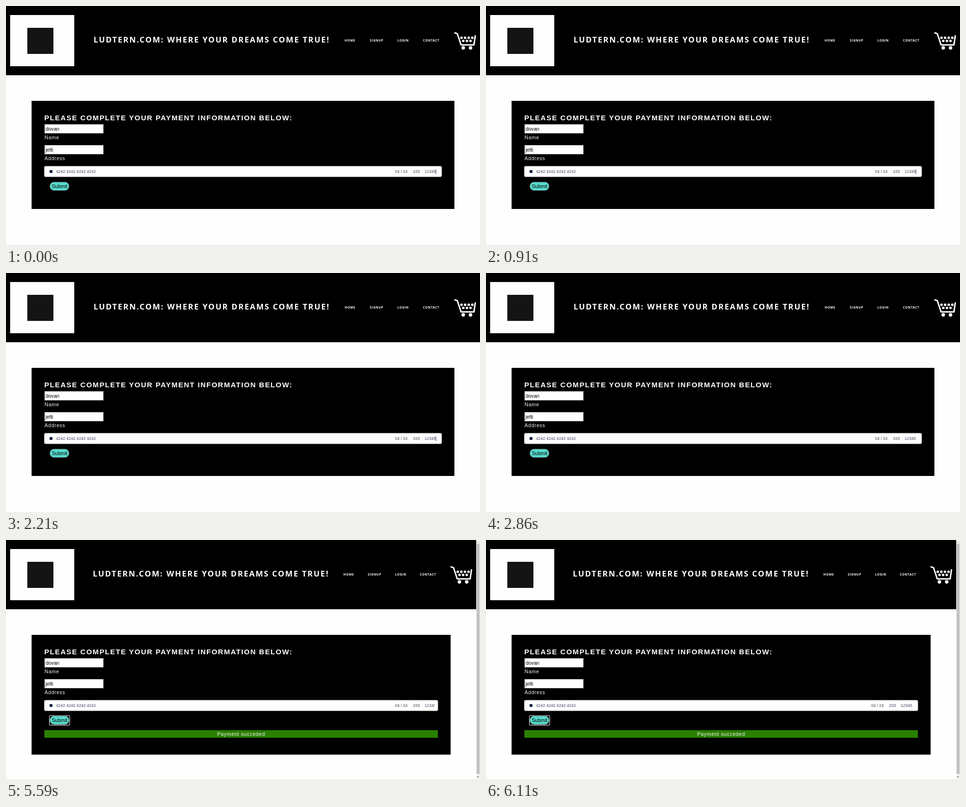
Write an HTML page that moves like this. It is 1000 px wide and 504 px high and loops after 8000 ms.

```html
<!DOCTYPE html>
<html lang="en">
<head>
<meta charset="utf-8">
<title>Payment form</title>
<style>
  html, body { margin: 0; width: 100%; height: 100%; overflow: hidden; background: #fefefe; }
  svg { display: block; width: 100vw; height: 100vh; }
  text { font: 10.667px "Liberation Sans", Arial, sans-serif; }
  .brand text { font: bold 6.5px "Open Sans", sans-serif; letter-spacing: .1em; fill: #fff; }
  .brand #title { font-size: 16.6px; letter-spacing: .122em; }
  #form-title { font-size: 15.3px; font-weight: bold; letter-spacing: .1em; fill: #fff; }
  .label { letter-spacing: .667px; fill: #f4f4f4; }
  .card text { font-size: 8.667px; fill: #45455c; }
  #card-box { fill: #fff; filter: drop-shadow(0 .667px 1px #e6ebf1); }
  .field { fill: #fff; stroke: #767676; }
</style>
</head>
<body>
<svg viewBox="0 0 1000 504">
  <defs>
    <clipPath id="card-clip"><rect id="card-clip-box" x="81" y="338" height="22"/></clipPath>
  </defs>
  <rect width="1000" height="504" fill="#fefefe"/>

  <g class="brand">
    <rect width="1000" height="146"/>
    <rect x="8.7" y="19" width="135.3" height="108" fill="#fefefe"/>
    <rect x="45" y="46" width="55" height="55" fill="#141414"/>
    <text id="title" y="77">LUDTERN.COM: WHERE YOUR DREAMS COME TRUE!</text>
    <g id="nav">
      <text y="75">HOME</text>
      <text y="75">SIGNUP</text>
      <text y="75">LOGIN</text>
      <text y="75">CONTACT</text>
    </g>
    <g id="cart" fill="#fff">
      <path d="M947 56.8L952.2 58.4L960 82H987.2L990 63" fill="none" stroke="#fff"
            stroke-width="3" stroke-linecap="round" stroke-linejoin="round"/>
      <g id="dots"></g>
      <circle cx="964.6" cy="88.2" r="3.7"/>
      <circle cx="980" cy="88.2" r="3.7"/>
    </g>
  </g>

  <rect id="panel" x="54" y="200"/>
  <text id="form-title" x="80.7" y="241">PLEASE COMPLETE YOUR PAYMENT INFORMATION BELOW:</text>
  <rect class="field" x="81.5" y="249.5" width="124" height="19"/>
  <text x="83.5" y="263">dovan</text>
  <text class="label" x="81.3" y="281">Name</text>
  <rect class="field" x="81.5" y="293.5" width="124" height="19"/>
  <text x="83.5" y="307">jelti</text>
  <text class="label" x="81.3" y="325">Address</text>

  <g class="card">
    <rect id="card-box" x="81" y="338" height="22" rx="2.7"/>
    <rect x="92" y="346" width="6" height="6" fill="#1b2447"/>
    <text x="105.5" y="352">4242 4242 4242 4242</text>
    <g clip-path="url(#card-clip)">
      <g id="details">
        <text x="820.7" y="352">04 / 24</text>
        <text x="858.6" y="352">333</text>
        <text x="883" y="352">12345</text>
        <rect id="caret" x="906.5" y="344.5" width="1" height="9.5" fill="#32325d"/>
      </g>
    </g>
  </g>

  <rect id="focus" x="91.5" y="370.5" width="43" height="20" rx="1.5" fill="none" stroke="#fff"/>
  <rect x="92.5" y="371.2" width="40.6" height="17.8" rx="8.9" fill="#58dccd" stroke="#5f6b6a"/>
  <text x="96.4" y="384">Submit</text>

  <g id="success">
    <rect x="81" y="401" width="830" height="16" fill="#2a8002"/>
    <text class="label" x="445.5" y="412.5">Payment succeded</text>
    <rect x="992" width="8" height="504" fill="#f1f1f1"/>
    <rect x="993" y="8" width="6" height="485" fill="#c1c1c1"/>
    <path d="M994 5.5h4l-2-2.6z" fill="#a3a3a3"/>
    <path d="M994 498.5h4l-2 2.6z" fill="#505050"/>
  </g>
</svg>
<script>
  const LOOP = 8000, STEP = 130, BLINK = 650;
  const FOCUS_AT = 3380, PAID_AT = 5590, SLIDE = 520;
  const NAV_X = { open: [714.6, 767.6, 825.7, 879.8], paid: [711.8, 763.3, 820.7, 873] };
  const $ = id => document.getElementById(id);
  const set = (node, attrs) => Object.entries(attrs).forEach(([k, v]) => node.setAttribute(k, v));
  const show = (id, on) => set($(id), { visibility: on ? "visible" : "hidden" });

  const dotRow = (count, x, y) => Array.from({ length: count },
    (_, i) => `<circle cx="${x + i * 7.6}" cy="${y}" r="2.7"/>`).join("");
  $("dots").innerHTML = dotRow(4, 961, 67) + dotRow(3, 964.8, 73.6);

  function draw(t) {
    const paid = t >= PAID_AT, focused = t >= FOCUS_AT;
    const shift = paid ? -8 : 0;
    set($("title"), { x: paid ? 183.2 : 184.7 });
    [...$("nav").children].forEach((link, i) => set(link, { x: NAV_X[paid ? "paid" : "open"][i] }));
    set($("cart"), { transform: `translate(${shift})` });
    set($("panel"), { width: 892 + shift, height: paid ? 252.6 : 228 });
    set($("card-box"), { width: 838 + shift });
    set($("card-clip-box"), { width: 831 + shift });

    // The card details ease left after the scrollbar narrows the page.
    const elapsed = Math.floor((t - PAID_AT) / STEP) * STEP;
    const p = Math.min(1, Math.max(0, elapsed / SLIDE));
    set($("details"), { transform: `translate(${-8 * (1 - (1 - p) ** 3)})` });

    show("caret", !focused && Math.floor((t + 390) / BLINK) % 2 === 0);
    show("focus", focused);
    show("success", paid);
  }

  const start = performance.now();
  function tick() {
    draw((performance.now() - start) % LOOP);
    requestAnimationFrame(tick);
  }
  tick();
</script>
</body>
</html>
```
